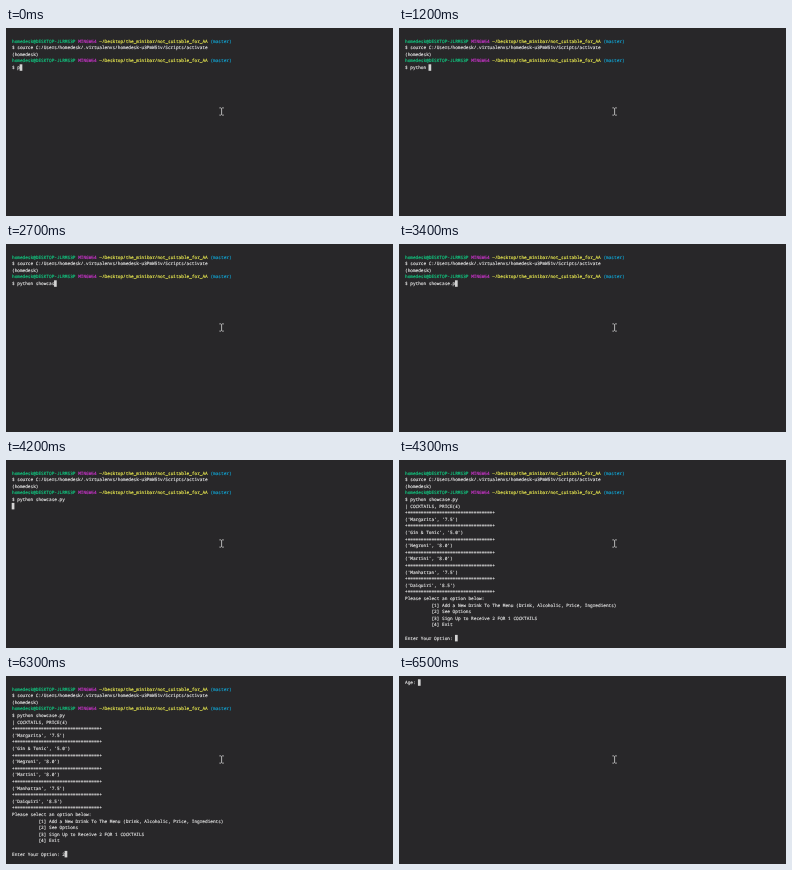
Recreate the animation shown at these times as an HTML page. Size 387 px wide and 188 px high, loop 8 s.

```html
<!DOCTYPE html>
<html lang="en">
<head>
<meta charset="utf-8">
<title>Terminal session</title>
<style>
  html, body { margin: 0; width: 100%; height: 100%; overflow: hidden; background: #282729; }
  svg { display: block; width: 100%; height: 100%; }
  text {
    font: 4.41px "Noto Sans Mono", "DejaVu Sans Mono", monospace;
    font-variant-ligatures: none;
    text-rendering: geometricPrecision;
    white-space: pre;
    color: #dedede;
    fill: currentColor;
    stroke: currentColor;
    stroke-width: .16px;
  }
</style>
</head>
<body>
<svg viewBox="0 0 387 188">
  <rect width="387" height="188" fill="#282729"/>
  <g id="screen"></g>
  <rect id="caret" width="2.7" height="6.5" fill="#d4d4d4"/>
  <path d="M213.4 79.9h1.4l.8 .6l.8-.6h1.4M215.6 80.5v6M213.4 87.1h1.4l.8-.6l.8 .6h1.4"
        fill="none" stroke="#c4c4c4" stroke-width=".9"/>
</svg>
<script>
const LOOP = 8000, LEFT = 6, CELL = 2.646, TOP = 3.3, ROW = 6.6, BASE = 4.7;
const USER = 'homedesk';
const GREEN = '#12c47f', MAGENTA = '#c233c2', YELLOW = '#eaea50', CYAN = '#129fcc';
const COMMAND = '$ python showcase.py';
const CHOICE = 'Enter Your Option: ';

const colX = col => LEFT + col * CELL;
const rowY = row => TOP + row * ROW;
const screen = document.getElementById('screen');
const caret = document.getElementById('caret');

function write(parent, row, col, str, color) {
  const el = document.createElementNS('http://www.w3.org/2000/svg', 'text');
  el.setAttribute('x', colX(col));
  el.setAttribute('y', rowY(row) + BASE);
  if (color) el.style.color = color;
  el.textContent = str;
  parent.appendChild(el);
  return el;
}

function group() {
  const g = document.createElementNS('http://www.w3.org/2000/svg', 'g');
  return screen.appendChild(g);
}

function prompt(parent, row) {
  const parts = [
    [USER + '@DESKTOP-JLRMS3P', GREEN],
    ['MINGW64', MAGENTA],
    ['~/Desktop/the_minibar/not_suitable_for_AA', YELLOW],
    ['(master)', CYAN]
  ];
  let col = 0;
  for (const [str, color] of parts) {
    write(parent, row, col, str, color);
    col += str.length + 1;
  }
}

const shell = group(), menu = group(), form = group();

prompt(shell, 1);
write(shell, 2, 0, `$ source C:/Users/${USER}/.virtualenvs/${USER}-u3PmW51v/Scripts/activate`);
write(shell, 3, 0, `(${USER})`);
prompt(shell, 4);
const command = write(shell, 5, 0, '');

const rule = '+' + '='.repeat(32) + '+';
const drinks = [['Margarita', '7.5'], ['Gin & Tonic', '5.0'], ['Negroni', '8.0'],
  ['Martini', '8.0'], ['Manhattan', '7.5'], ['Daiquiri', '8.5']];
const options = ['Add a New Drink To The Menu (Drink, Alcoholic, Price, Ingredients)',
  'See Options', 'Sign Up to Receive 2 FOR 1 COCKTAILS', 'Exit'];

write(menu, 6, 0, '| COCKTAILS, PRICE(£)');
write(menu, 7, 0, rule);
drinks.forEach(([name, price], i) => {
  write(menu, 8 + 2 * i, 0, `('${name}', '${price}')`);
  write(menu, 9 + 2 * i, 0, rule);
});
write(menu, 20, 0, 'Please select an option below:');
options.forEach((label, i) => write(menu, 21 + i, 10, `[${i + 1}] ${label}`));
const choice = write(menu, 26, 0, CHOICE);

write(form, 0, 0, 'Age:');

// [time in ms, characters of the command line visible from then on]
const keys = [[0, 3], [300, 4], [400, 5], [500, 7], [1000, 8], [1200, 9],
  [1500, 10], [1700, 11], [1900, 12], [2300, 14], [2500, 15], [2700, 16],
  [3100, 18], [3400, 19], [3700, 20]];

const ENTER = 4200, MENU = 4300, PICK = 6100, FORM = 6500;

const show = (el, on) => el.setAttribute('visibility', on ? 'visible' : 'hidden');

function draw(t) {
  const typed = keys.filter(([at]) => at <= t).pop()[1];
  command.textContent = COMMAND.slice(0, typed);
  choice.textContent = CHOICE + (t >= PICK ? '2' : '');
  show(shell, t < FORM);
  show(menu, t >= MENU && t < FORM);
  show(form, t >= FORM);

  let row = 5, col = typed;
  if (t >= FORM) [row, col] = [0, 5];
  else if (t >= MENU) [row, col] = [26, choice.textContent.length];
  else if (t >= ENTER) [row, col] = [6, 0];
  caret.setAttribute('x', colX(col) - .3);
  caret.setAttribute('y', rowY(row));
}

function tick() {
  draw(performance.now() % LOOP);
  requestAnimationFrame(tick);
}
tick();
</script>
</body>
</html>
```
